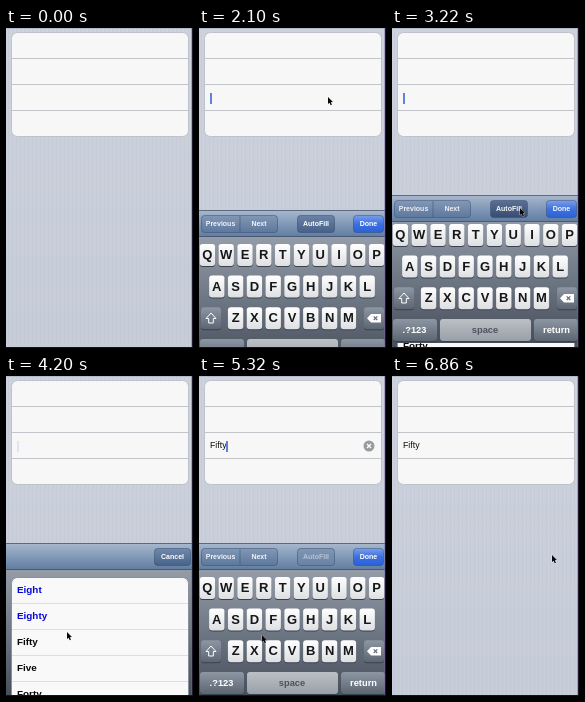
These frames come from a looping animation (187 px wide and 320 px high, 7000 ms). An HTML page with a canvas:

```html
<!DOCTYPE html>
<html lang="en">
<head>
<meta charset="utf-8">
<title>Form autofill</title>
<style>
  html, body { margin: 0; width: 100%; height: 100%; overflow: hidden; background: #cad0dc; }
  canvas { display: block; width: 187px; height: 320px; }
</style>
</head>
<body>
<canvas id="stage"></canvas>
<script>
const W = 187, H = 320, LOOP = 7000, STEP = 140;
const BAR_TOP = 167, KEYS_TOP = 194, KEYS_H = H - KEYS_TOP;
const canvas = document.getElementById('stage');
const ctx = canvas.getContext('2d');
const dpr = window.devicePixelRatio || 1;
canvas.width = W * dpr;
canvas.height = H * dpr;

// Pointer path: time, x, y of the tip
const path = [
  [420, 190, 136], [1260, 129, 69], [2240, 129, 69], [2940, 128, 180],
  [3500, 128, 180], [4060, 61, 256], [4200, 61, 256], [4480, 63, 259],
  [5320, 63, 259], [5880, 166, 179], [6580, 166, 179], [6860, 160, 179]
];

const smooth = u => { u = Math.min(1, Math.max(0, u)); return u * u * (3 - 2 * u); };
const ramp = (t, start, length) => smooth((t - start) / length);

function shade(y, h, ...colors) {
  const g = ctx.createLinearGradient(0, y, 0, y + h);
  colors.forEach((c, i) => g.addColorStop(i / (colors.length - 1), c));
  return g;
}

function rect(x, y, w, h, fill) {
  ctx.fillStyle = fill;
  ctx.fillRect(x, y, w, h);
}

function box(x, y, w, h, r, fill, stroke) {
  ctx.beginPath();
  ctx.roundRect(x, y, w, h, r);
  ctx.fillStyle = fill;
  ctx.fill();
  if (stroke) {
    ctx.strokeStyle = stroke;
    ctx.lineWidth = 1;
    ctx.stroke();
  }
}

function label(text, x, y, size, color, weight = 'bold', align = 'center') {
  ctx.font = `${weight} ${size}px "Liberation Sans", Arial, sans-serif`;
  ctx.textAlign = align;
  ctx.textBaseline = 'middle';
  ctx.fillStyle = color;
  ctx.fillText(text, x, y);
}

function polygon(points) {
  ctx.beginPath();
  points.forEach(([x, y]) => ctx.lineTo(x, y));
  ctx.closePath();
}

function cross(x, y, r, color) {
  ctx.beginPath();
  ctx.moveTo(x - r, y - r); ctx.lineTo(x + r, y + r);
  ctx.moveTo(x + r, y - r); ctx.lineTo(x - r, y + r);
  ctx.strokeStyle = color;
  ctx.lineWidth = 1.3;
  ctx.stroke();
}

function drawForm(t) {
  rect(0, 0, W, H, shade(0, H, '#cdd2dd', '#c7cdd8'));
  for (let x = 2; x < W; x += 4) rect(x, 0, 1, H, 'rgba(174,186,200,.2)');
  rect(0, 0, W, 1, '#b3bac9');
  box(5.5, 4.5, 177, 104, 6, '#f7f7f7', '#bfc2c9');
  for (let y = 30; y < 90; y += 26) rect(6, y, 176, 1, '#c3c4c9');

  const filled = t >= 4620, editing = t >= 1820 && t < 6020;
  if (filled) label('Fifty', 11, 70, 8.8, '#111', 'normal', 'left');
  if (editing) {
    const phase = (t - 1300) / 800 % 1;
    ctx.globalAlpha = phase > .5 && phase < .64 ? .15 : 1;
    rect(filled ? 27 : 11, 65, 2, 11, '#5f82da');
    ctx.globalAlpha = 1;
    if (filled) {
      ctx.beginPath();
      ctx.arc(170, 70, 5.5, 0, Math.PI * 2);
      ctx.fillStyle = '#999b9f';
      ctx.fill();
      cross(170, 70, 2, '#fff');
    }
  }
}

function barButton(text, x, w, colors, color = '#fff') {
  box(x + .5, 172.5, w - 1, 17, 3, shade(172, 18, ...colors), 'rgba(48,70,104,.45)');
  label(text, x + w / 2, 181.5, 7, color);
}

function drawBar() {
  rect(0, BAR_TOP, W, 27, shade(BAR_TOP, 27, '#a9b8cd', '#829ab8', '#617c9f'));
  rect(0, BAR_TOP, W, 1, '#5a6a82');
  rect(0, KEYS_TOP - 1, W, 1, '#465a77');
}

function drawInputBar(t) {
  const steel = ['#8298b6', '#5c779c'];
  const dark = ['#5a6d92', '#354970'];
  drawBar();
  barButton('', 2, 77, steel);
  rect(40.5, 173, 1, 16, 'rgba(48,70,104,.45)');
  label('Previous', 21.5, 181.5, 7, '#f0f3f8');
  label('Next', 60, 181.5, 7, '#f0f3f8');

  if (t >= 4620) barButton('AutoFill', 98, 38, ['#8096b3', '#6882a5'], '#b5c3d6');
  else barButton('AutoFill', 98, 38, t >= 3080 ? dark : ['#6b83a6', '#456087']);
  barButton('Done', 154, 31, t >= 5880 ? dark : ['#7da0ec', '#3c70df', '#2860d9']);
}

function key(x, y, w, colors) {
  box(x, y + 1, w, 22, 3, '#39414d');
  box(x, y, w, 22, 3, shade(y, 22, ...colors));
}

function drawBackdrop() {
  rect(0, KEYS_TOP, W, KEYS_H, shade(KEYS_TOP, KEYS_H, '#949ca8', '#6d7683', '#464e5a'));
}

function drawKeyboard() {
  const light = ['#ffffff', '#dedfe2'], gray = ['#8d96a3', '#5c6673'];
  drawBackdrop();
  ['QWERTYUIOP', 'ASDFGHJKL', 'ZXCVBNM'].forEach((row, r) => {
    const y = 201 + r * 31.6;
    [...row].forEach((letter, i) => {
      const x = 93 + (i - (row.length - 1) / 2) * 18.8;
      key(x - 7.7, y, 15.4, light);
      label(letter, x, y + 11.5, 13, '#15171a');
    });
  });

  key(2, 264.2, 20, gray);
  polygon([[12, 270], [17, 275.5], [14.3, 275.5], [14.3, 280], [9.7, 280], [9.7, 275.5], [7, 275.5]]);
  ctx.strokeStyle = '#fff';
  ctx.lineWidth = 1;
  ctx.stroke();

  key(165, 264.2, 20, gray);
  polygon([[168, 275.2], [172, 271], [182, 271], [182, 279.5], [172, 279.5]]);
  ctx.fillStyle = '#fff';
  ctx.fill();
  cross(176.5, 275.2, 1.8, '#68717e');

  key(1, 296, 44, gray);
  key(48, 296, 91, ['#bcc0c6', '#999fa8']);
  key(142, 296, 44, gray);
  label('.?123', 22.5, 307.5, 9.3, '#fff');
  label('space', 93, 307.5, 9.3, '#4c525b');
  label('return', 164.5, 307.5, 9.3, '#fff');
}

function drawPicker() {
  drawBackdrop();
  box(5.5, 201.5, 177, 150, 6, '#f9f9f9', '#8b919b');
  ['Eight', 'Eighty', 'Fifty', 'Five', 'Forty'].forEach((word, i) => {
    const y = 214 + i * 26;
    label(word, 11, y, 9.9, i < 2 ? '#0808d8' : '#080808', 'bold', 'left');
    rect(6, y + 13, 176, 1, '#dddee0');
  });
  drawBar();
  barButton('Cancel', 148, 37, ['#7189ab', '#46618a']);
}

function drawPanel(t) {
  const shown = ramp(t, 1830, 335) - ramp(t, 6100, 335);
  if (shown <= 0) return;
  const lift = ramp(t, 3180, 340) - ramp(t, 4600, 340);
  ctx.save();
  ctx.translate(0, Math.round((H - BAR_TOP) * (1 - shown)));
  if (lift > 0) drawPicker();
  if (lift < 1) {
    ctx.save();
    ctx.beginPath();
    ctx.rect(0, KEYS_TOP, W, KEYS_H);
    ctx.clip();
    ctx.translate(0, -Math.round(KEYS_H * lift));
    drawKeyboard();
    ctx.restore();
    ctx.globalAlpha = 1 - lift;
    drawInputBar(t);
  }
  ctx.restore();
}

function drawEdges() {
  rect(185, 0, 1, H, 'rgba(120,100,170,.45)');
  rect(186, 0, 1, H, '#1c1a2c');
  rect(0, H - 1, W, 1, '#14141a');
}

function drawPointer(t) {
  if (t < 560) return;
  const next = path.findIndex(p => p[0] >= t);
  const [t0, x0, y0] = path[Math.max(0, next - 1)], [t1, x1, y1] = path[next];
  const u = smooth((t - t0) / (t1 - t0));
  ctx.save();
  ctx.translate(x0 + (x1 - x0) * u, y0 + (y1 - y0) * u);
  ctx.scale(.88, .88);
  polygon([[0, 0], [0, 8], [1.8, 6.4], [3.1, 9.4], [4.5, 8.8], [3.2, 5.9], [5.6, 5.7]]);
  ctx.strokeStyle = 'rgba(255,255,255,.6)';
  ctx.lineWidth = 1;
  ctx.stroke();
  ctx.fillStyle = '#080808';
  ctx.fill();
  ctx.restore();
}

function frame() {
  const t = Math.floor(performance.now() % LOOP / STEP) * STEP;
  ctx.setTransform(dpr, 0, 0, dpr, 0, 0);
  drawForm(t);
  drawPanel(t);
  drawEdges();
  drawPointer(t);
  requestAnimationFrame(frame);
}
frame();
</script>
</body>
</html>
```
